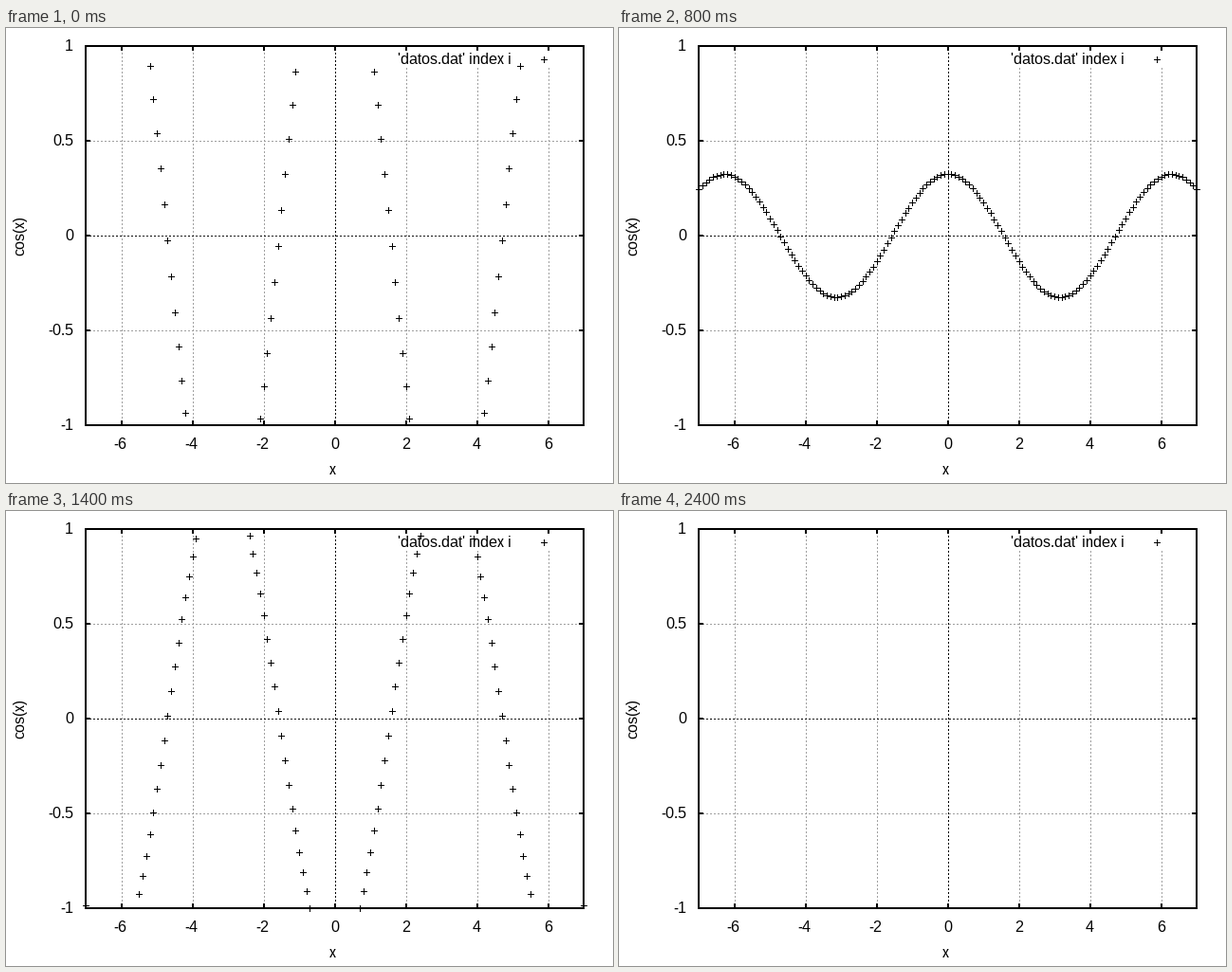
Recreate the animation shown at these times as a matplotlib script. Size 640 px wide and 480 px high, loop 8 s.

```python
import numpy as np
import matplotlib.pyplot as plt
from matplotlib.animation import FuncAnimation
from matplotlib.collections import PolyCollection

W, H, DPI = 640, 480, 100
LEFT, RIGHT, TOP, BOTTOM = 84, 609, 19, 419
FRAMES, STEP_MS = 80, 100
LAST_WAVE = 23                  # afterwards every point is off the scale

# Standing wave plus the sawtooth error of an unstable time step
AMP, OMEGA, ZERO = 1.951, 0.15, 9.114
GROWTH = -((1 + 5 ** 0.5) / 2) ** 4
NOISE_STEP = 20
LEVEL = 0.62
BUMPS = [(0, -0.5, 0.45), (1.385, -0.24, 0.35), (2.72, 0.62, 0.47),
         (4.44, -4.04, 0.654), (7.1, -1.4, 0.4)]    # centre, height, width


def bump(x, centre, height, width):
    return height * np.exp(-((x - centre) / width) ** 2)


index = np.arange(-70, 71)
xs = index / 10
envelope = LEVEL + sum(bump(abs(xs), *b) for b in BUMPS)
envelope += bump(xs, -1.2, 0.16, 0.62) * (xs < 0)
noise = np.where(index % 2 == 0, 1, -1) * envelope


def wave(k):
    amp = AMP * np.sin(OMEGA * (ZERO - k))
    return amp * np.cos(xs) + noise * GROWTH ** (k - NOISE_STEP)


def px(x):
    return np.floor(LEFT + 37.5 * (x + 7) + 0.5 + 1e-9)


def py(y):
    return H - 1 - np.floor(60.5 + 200 * (y + 1) + 1e-9)


def rect(x0, y0, x1, y1):
    return [(x0, y0), (x1, y0), (x1, y1), (x0, y1)]


def plus(x, y):
    return [rect(x - 3, y, x + 4, y + 1), rect(x, y - 3, x + 1, y + 4)]


def dots_h(y):
    return [rect(x, y, x + 2, y + 1) for x in range(LEFT, RIGHT, 4)]


def dots_v(x, top=TOP):
    return [rect(x, y - 1, x + 1, y + 1) for y in range(BOTTOM, top, -4)]


plt.rcParams["font.family"] = "Liberation Sans"
plt.rcParams["text.hinting"] = "default"
plt.rcParams["text.hinting_factor"] = 1     # whole-pixel letter spacing
fig = plt.figure(figsize=(W / DPI, H / DPI), dpi=DPI, facecolor="white")
ax = fig.add_axes([0, 0, 1, 1])
ax.set_xlim(0, W)
ax.set_ylim(H, 0)
ax.axis("off")


def add(rects, color, z):
    shapes = PolyCollection(rects, facecolors=color, linewidths=0,
                            antialiased=False, zorder=z)
    ax.add_collection(shapes, autolim=False)
    return shapes


def label(x, y, text, ha="center", **kw):
    ax.text(x, y, text, ha=ha, va="baseline", fontsize=16 * 72 / DPI,
            color="black", zorder=4, **kw)


x_ticks = [(v, int(px(v))) for v in range(-6, 7, 2)]
y_ticks = [(v, int(py(v))) for v in (-1, -0.5, 0, 0.5, 1)]

# Grid stops below the key
grid = []
for v, x in x_ticks:
    if v:
        grid += dots_v(x, 42 if v > 0 else TOP)
for v, y in y_ticks[1:-1]:
    if v:
        grid += dots_h(y)
add(grid, "#a0a0a0", 1)
add(dots_v(347) + dots_h(219), "black", 2)

# Border and ticks
frame = [rect(LEFT - 1, TOP - 1, RIGHT + 1, TOP + 1),
         rect(LEFT - 1, BOTTOM - 1, RIGHT + 1, BOTTOM + 1),
         rect(LEFT - 1, TOP - 1, LEFT + 1, BOTTOM + 1),
         rect(RIGHT - 1, TOP - 1, RIGHT + 1, BOTTOM + 1)]
for v, x in x_ticks:
    frame += [rect(x - 1, TOP, x + 1, TOP + 5),
              rect(x - 1, BOTTOM - 5, x + 1, BOTTOM)]
    label(x - (0.5 if v >= 0 else 2), 444, str(v))
for v, y in y_ticks:
    frame += [rect(LEFT, y - 1, LEFT + 5, y + 1),
              rect(RIGHT - 5, y - 1, RIGHT, y + 1)]
    label(71, y + 5, f"{v:g}", ha="right")
add(frame + plus(567, 33), "black", 3)

label(344, 471, "x")
label(19, 219, "cos(x)", rotation=90, rotation_mode="anchor")
label(533, 38, "'datos.dat' index i", ha="right")

points = add([], "black", 5)


def draw(k):
    rects = []
    if k <= LAST_WAVE:
        ys = wave(k)
        seen = abs(ys) <= 1
        for x, y in zip(px(xs[seen]), py(ys[seen])):
            rects += plus(x, y)
    points.set_verts(rects)
    return [points]


anim = FuncAnimation(fig, draw, frames=FRAMES, interval=STEP_MS,
                     init_func=lambda: draw(0), repeat=True, repeat_delay=0)
plt.show()
```
